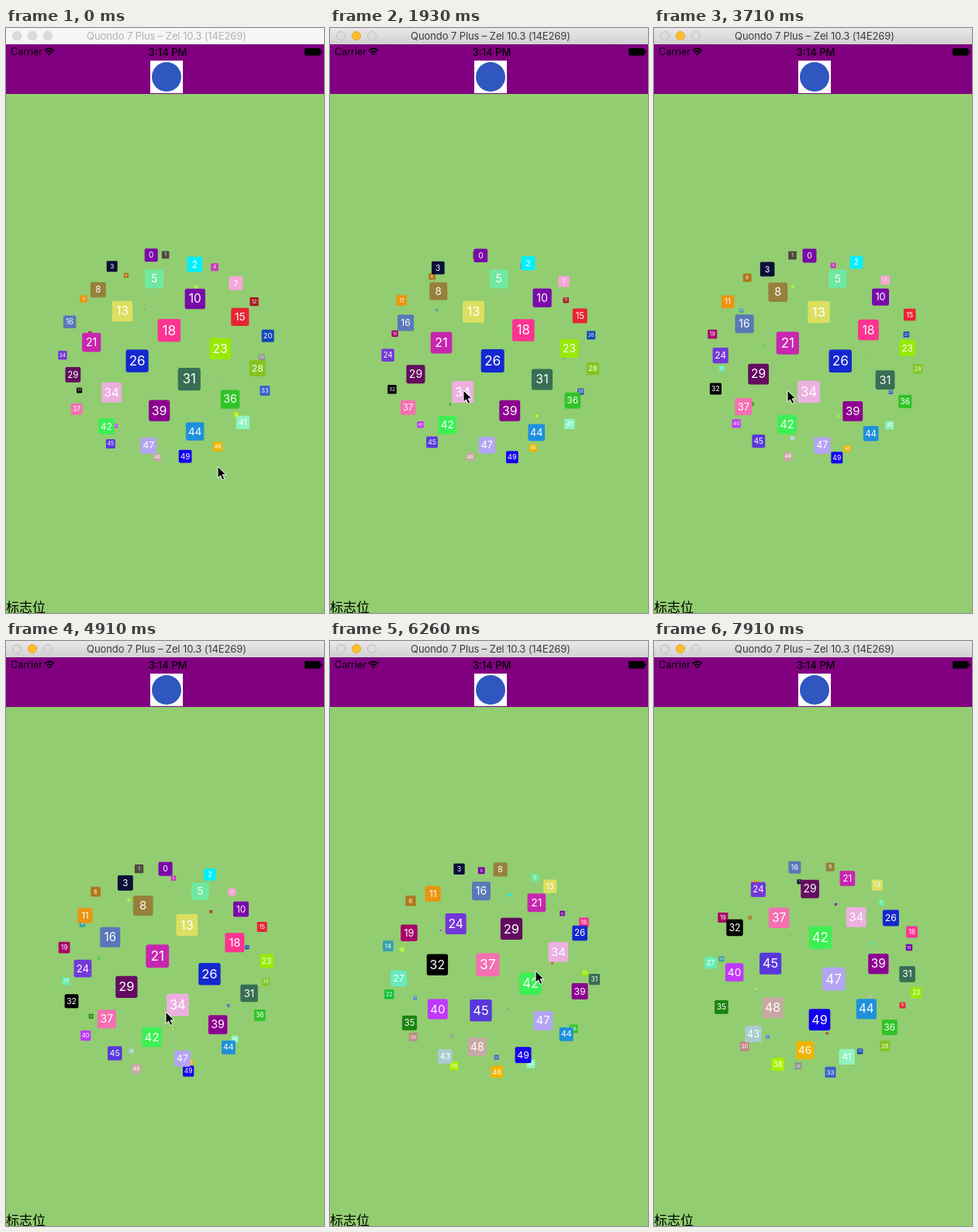
These frames come from a looping animation (410 px wide and 754 px high, 8000 ms). An HTML page:

```html
<!DOCTYPE html>
<html lang="zh">
<head>
<meta charset="utf-8">
<title>Tag sphere</title>
<style>
  html, body { margin: 0; width: 100%; height: 100%; overflow: hidden; }
  #stage { position: relative; width: 410px; height: 754px; overflow: hidden; background: #92cd71; color: #000;
    font: 13px/16px Inter, Roboto, sans-serif; }
  #stage > * { position: absolute; }
  #title { left: 0; top: 0; width: 410px; height: 21px; line-height: 21px; text-align: center; padding-left: 4px;
    box-sizing: border-box; background: #f6f6f6; color: #b2b2b2; white-space: nowrap; }
  #title span { letter-spacing: -.1px; }
  #title i { position: absolute; top: 4px; width: 12px; height: 12px; border-radius: 50%; box-sizing: border-box;
    background: #dcdcdc; border: 1px solid #cfcfcf; }
  #title.on { background: linear-gradient(#e9e7e9, #d2d0d2); color: #3c3c3c; }
  #title.on i { background: #dddbdd; border-color: #bfbdbf; }
  #title.on i.mid { background: #fdbd2f; border-color: #e6a825; }
  #bar { left: 0; top: 21px; width: 410px; height: 64px; background: #800080; }
  #logo { left: 186px; top: 42px; width: 42px; height: 42px; background: #fff; }
  #logo::after { content: ""; position: absolute; left: 2px; top: 2px; width: 38px; height: 38px;
    border-radius: 50%; background: #2f57bf; }
  #label { left: 0; top: 734px; font: 17px/24px "Noto Sans CJK SC", "Noto Sans CJK", sans-serif; white-space: nowrap; }
  .tag { left: -15px; top: -15px; width: 30px; height: 30px; border-radius: 3px; color: #fff;
    font: 17.5px/30px Inter, Roboto, sans-serif; text-align: center; }
  #cursor { left: -2px; top: -2px; z-index: 5000; }
</style>
</head>
<body>
<div id="stage">
  <div id="title"><i style="left:8px"></i><i class="mid" style="left:28px"></i><i style="left:48px"></i><span>Quondo 7 Plus – Zel 10.3 (14E269)</span></div>
  <div id="bar"></div>
  <div style="left:6px; top:23px; font-size:12.5px">Carrier</div>
  <svg style="left:49px; top:25px" width="14" height="11" fill="none" stroke="#000" stroke-width="1.9">
    <path d="M1 4.2Q7 -1 13 4.2M3.2 6.7Q7 3.2 10.8 6.7"/>
    <path d="M5 8.2Q7 6.6 9 8.2L7 10.4Z" fill="#000" stroke="none"/>
  </svg>
  <div style="left:158px; top:23px; width:101px; text-align:center; font-weight:500">3:14 PM</div>
  <svg style="left:384px; top:25px" width="24" height="12">
    <rect x="1" y="1" width="20.5" height="9.5" rx="1.5"/><rect x="22" y="4" width="1.3" height="3.5"/>
  </svg>
  <div id="logo"></div>
  <div id="label">标志位</div>
  <svg id="cursor" width="18" height="24">
    <path d="M2 2V17.2L5.5 13.9L8 19.4L10.8 18.2L8.3 12.8H13Z" stroke="#fff" stroke-width="1"/>
  </svg>
</div>
<script>
const stage = document.getElementById('stage');
const title = document.getElementById('title');
const cursor = document.getElementById('cursor');

const COLORS = `7b08a8 4f4a3e 00f0ff 0a1038 c83fb8 70e8a0 b0761a f8a6d8 97803c a8f040
  7a0aaa ec9410 a81c24 dce060 38a0ac e82434 5878b8 4c88e0 fc3490 a80468
  1048b8 c826b0 10c038 98ea04 7438d8 909098 1428d0 68ecbc 84c420 640c60
  c08888 386e54 000000 3c60c8 ecb0e0 1c8410 30c428 f470b0 a8f000 8c0090
  c038fc 90f4c0 3cf054 a8ccd0 2090dc 5838dc f0b400 b4a4f4 c8a8a4 1400f0`.split(/\s+/);

// time, yaw, roll, pitch in degrees
const POSE = [
  [0, 133.6, .7, .6], [1180, 121.3, .8, .5], [2510, 108.6, .9, .2],
  [3710, 99.5, 1, 0], [4910, 88.4, 1, -.2], [5060, 86.8, 1.2, .5],
  [6260, 51.8, 11.7, 33.8], [6860, 58.6, 1.7, 50.8], [7910, 64.1, -6.5, 64.7]
];
// time, x, y of the pointer tip
const POINTER = [
  [0, 273, 565], [1180, 262, 549], [1930, 172, 467], [4310, 172, 467],
  [4910, 206, 478], [6260, 265, 425], [6710, 224, 362], [7610, 369, 662],
  [7760, 381, 740], [7910, 395, 790]
];
const LOOP = 8000, ACTIVE_AT = 1930;

// The picture advances in small uneven ticks.
const TICKS = [0];
for (let i = 0; i < 53; i++) TICKS.push(TICKS[i] + ([0, 7, 15, 16].includes(i) ? 140 : 150));

const golden = Math.PI * (3 - Math.sqrt(5));
const tags = COLORS.map((color, i) => {
  const el = document.createElement('div');
  el.className = 'tag';
  el.textContent = i;
  el.style.background = '#' + color;
  stage.insertBefore(el, cursor);
  const y = (i + .5) * 2 / COLORS.length - 1;
  const r = Math.sqrt(1 - y * y);
  return { el, x: r * Math.cos(i * golden), y, z: r * Math.sin(i * golden) };
});

function sample(table, t) {
  let i = 0;
  while (i < table.length - 2 && t >= table[i + 1][0]) i++;
  const a = table[i], b = table[i + 1];
  const f = Math.min(1, (t - a[0]) / (b[0] - a[0]));
  return a.slice(1).map((v, k) => v + (b[k + 1] - v) * f);
}

const turn = (a, b, deg) => {
  const c = Math.cos(deg * Math.PI / 180), s = Math.sin(deg * Math.PI / 180);
  return [a * c - b * s, a * s + b * c];
};

// Nearer tags are larger and sit on a slightly tighter circle.
function place(tag, yaw, roll, pitch) {
  let { x, y, z } = tag;
  [x, z] = turn(x, z, yaw);
  [y, x] = turn(y, x, roll);
  [y, z] = turn(y, z, pitch);
  const radius = 134.3 - 13.5 * z;
  const px = 206.8 + 1.4 * z + radius * x, py = 422.5 + radius * y;
  tag.el.style.transform = `translate(${px.toFixed(2)}px, ${py.toFixed(2)}px) scale(${((z + 1) / 2).toFixed(4)})`;
  tag.el.style.zIndex = Math.round(1000 + 900 * z);
}

let shown = -1;
function draw(t) {
  if (t === shown) return;
  shown = t;
  const pose = sample(POSE, t);
  for (const tag of tags) place(tag, ...pose);
  const [x, y] = sample(POINTER, t);
  cursor.style.transform = `translate(${x}px, ${y}px)`;
  title.className = t >= ACTIVE_AT ? 'on' : '';
}

const start = performance.now();
function frame() {
  const t = (performance.now() - start) % LOOP;
  draw(TICKS.findLast(tick => tick <= t));
  requestAnimationFrame(frame);
}
draw(0);
requestAnimationFrame(frame);
</script>
</body>
</html>
```
